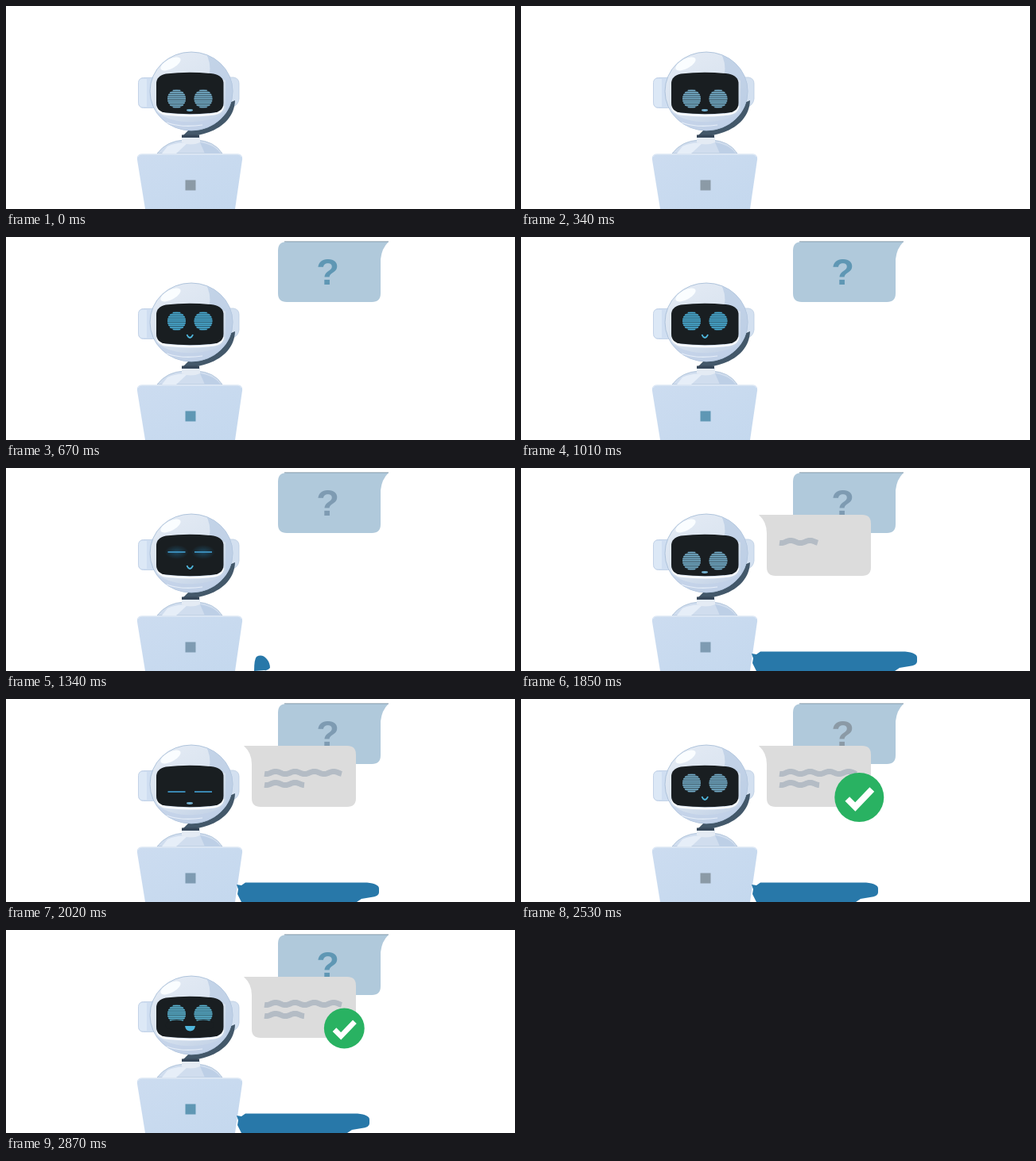
Animation, 640 px wide and 256 px high, one loop 3500 ms. Source, as an HTML page:

```html
<!DOCTYPE html>
<html lang="en">
<head>
<meta charset="utf-8">
<title>Robot assistant</title>
<style>
  html, body { margin: 0; width: 100%; height: 100%; overflow: hidden; background: #fff; }
  svg { display: block; width: 100vw; height: 100vh; }
  text { font: bold 47px "Liberation Sans", Arial, sans-serif; }
</style>
</head>
<body>
<svg viewBox="0 0 640 256">
  <defs>
    <linearGradient id="shell" x1=".2" y1="0" x2=".75" y2="1">
      <stop offset="0" stop-color="#e3eaf4"/>
      <stop offset=".5" stop-color="#dae4f0"/>
      <stop offset="1" stop-color="#c0d0e5"/>
    </linearGradient>
    <linearGradient id="lid" x1="0" y1="0" x2="1" y2="1">
      <stop offset="0" stop-color="#ccdcf0"/>
      <stop offset="1" stop-color="#c4d8ee"/>
    </linearGradient>
    <radialGradient id="glow">
      <stop offset="0" stop-color="#1f6d96" stop-opacity=".5"/>
      <stop offset="1" stop-color="#1f6d96" stop-opacity="0"/>
    </radialGradient>
    <clipPath id="headClip"><ellipse cx="233" cy="107.500" rx="52" ry="49.500"/></clipPath>
  </defs>

  <g id="robot">
    <rect x="166.500" y="90.500" width="24" height="38" rx="6" fill="#cfdef1" stroke="#c3d3e8"/>
    <path d="M170 92h7v35h-7q-3-2-3-6V97q0-4 3-5Z" fill="#dce8f6"/>
    <path d="M279 90h7q7 1 7 8v19q-1 8-8 10h-6Z" fill="#d3e0f0" stroke="#bccde2" stroke-width=".8"/>
    <path d="M288 119C287 146 262 164 221 165L230 156C256 155 276 140 281 122Z" fill="#43586a"/>
    <path d="M190 186Q202 170 224 169h15Q262 170 272 186Z" fill="#d0ddee" stroke="#a9bed6" stroke-width=".8"/>
    <path d="M244 172Q262 175 270 186H250Z" fill="#bdcfe6"/>
    <path d="M203 177Q216 171 228 173L214 186H196Z" fill="#e6eef8"/>
    <path d="M221 165h23v7q-12 5-23 0Z" fill="#e4ebf4"/>
    <path d="M221 162.500h22v3.500h-22Z" fill="#37485a"/>
    <ellipse cx="233" cy="107.500" rx="52" ry="49.500" fill="url(#shell)" stroke="#a9bfd8" stroke-width=".9"/>
    <g clip-path="url(#headClip)">
      <path d="M250 57Q258 70 256 84L276 94V140L300 130V70Z" fill="#bacde5" opacity=".75"/>
      <path d="M184 128Q202 148 237 146T284 122V160H190Z" fill="#c0d1e8" opacity=".7"/>
      <path d="M202 147Q222 154 247 150" fill="none" stroke="#e6eef8" stroke-width="1.200"/>
    </g>
    <ellipse cx="207" cy="73" rx="14" ry="6" transform="rotate(-29 207 73)" fill="#fafdff"/>
    <path d="M190 126Q191 135 202 136.500Q231 140 260 136.500Q272 135 273 126" fill="none" stroke="#f8fbff" stroke-width="2.500"/>
    <path d="M201 85.500Q231 82 261 85.500Q273.500 88 273.500 98V122Q273.500 133 261 134.500Q231 138 201 134.500Q189 133 189 122V98Q189 88 201 85.500Z" fill="#191e21"/>
    <g id="face"></g>
    <path d="M171 187H291Q298 187 297 194L288 256H175L165 194Q164 187 171 187Z" fill="url(#lid)"/>
    <path d="M166 190Q167 187 171 187H291Q295 187 296 190" fill="none" stroke="#dde8f5" stroke-width="1.500"/>
    <rect id="badge" x="225.500" y="219.500" width="13" height="13"/>
  </g>

  <g id="question">
    <path d="M353 6H481Q472.500 14 471 28V71Q471 82 460 82H353Q342 82 342 71V17Q342 6 353 6Z" fill="#b0c9db"/>
    <path d="M350 5.800H481" stroke="#627c8e" stroke-width=".7"/>
    <text id="mark" x="404.500" y="60" text-anchor="middle">?</text>
  </g>

  <path id="answer" fill="#dcdcdc"/>
  <g id="lines" fill="none" stroke="#b4bcc5" stroke-width="7"></g>
  <g id="check">
    <circle r="31" fill="#29b262"/>
    <path d="M-15 2L-5 12L16-10" fill="none" stroke="#fff" stroke-width="8"/>
  </g>
  <path id="blob" fill="#2878a9"/>
</svg>

<script>
const LOOP = 3500;
const GREY = '#8b9aa6', SLATE = '#7e9bb2', BLUE = '#5f97b4';
const VISOR = '#191e21';
const $ = id => document.getElementById(id);

// Each step holds until the next; omitted properties keep their value.
const steps = [
  { at: 0, eyes: 'open', eyeY: 117, mouth: 'dash', tint: GREY, glowing: '#74adc9',
    question: false, answer: 0, lines: 0, check: 0, blob: 0 },
  { at: 670, eyeY: 106, mouth: 'smile', tint: BLUE, glowing: '#4aaed6', question: true },
  { at: 1340, eyes: 'shut', tint: SLATE, blob: 332 },
  { at: 1510, eyes: 'open', eyeY: 117, mouth: 'dash', glowing: '#74adc9', answer: .25, blob: 337 },
  { at: 1680, answer: .6, blob: 343 },
  { at: 1850, answer: 1, lines: .5, blob: 498 },
  { at: 2020, eyes: 'shut', lines: 1, blob: 469 },
  { at: 2190, eyes: 'open', eyeY: 106, mouth: 'smile', blob: 476 },
  { at: 2360, check: .5, blob: 474 },
  { at: 2530, tint: GREY, check: 1, blob: 449 },
  { at: 2700, check: .87, blob: 472 },
  { at: 2870, eyes: 'happy', mouth: 'grin', tint: BLUE, glowing: '#5ab4d2', check: .82, blob: 457 }
];

const mouths = {
  dash: c => `<ellipse cx="231" cy="131.500" rx="4" ry="1.400" fill="${c}"/>`,
  smile: c => `<path d="M227.500 123Q229 127 231.200 127Q233.500 127 235 123" fill="none" stroke="${c}" stroke-width="1.800"/>`,
  grin: c => `<path d="M225 121H238Q237 127.500 231.500 127.500T225 121Z" fill="${c}"/>`
};

function eye(x, { eyes, eyeY: y, glowing }) {
  if (eyes === 'shut') {
    const glow = y < 110 ? `<ellipse cx="${x}" cy="${y}" rx="15" ry="9" fill="url(#glow)"/>` : '';
    return `${glow}<path d="M${x - 11} ${y}h22" stroke="#3e93c2" stroke-width="1.800"/>`;
  }
  const radius = 11.5;
  let rows = '';
  for (let dy = -10.5; dy <= 11; dy += 2.625) {
    const half = Math.sqrt(radius ** 2 - dy ** 2);
    rows += `M${x - half} ${y + dy}h${2 * half}`;
  }
  const cheek = eyes === 'happy'
    ? `<ellipse cx="${x}" cy="${y + 14}" rx="14" ry="6.500" fill="${VISOR}"/>` : '';
  return `<circle cx="${x}" cy="${y}" r="${radius}" fill="${glowing}" opacity=".42"/>
    <path d="${rows}" stroke="${glowing}" stroke-width="1.500"/>${cheek}`;
}

function answerPath(scale) {
  if (!scale) return '';
  const left = 299 + 10 * scale, right = 299 + 141 * scale;
  const bottom = 59 + 77 * scale, tail = 59 + 23 * scale;
  const r = Math.min(11, 18 * scale);
  return `M299 59H${right - r}Q${right} 59 ${right} ${59 + r}V${bottom - r}
    Q${right} ${bottom} ${right - r} ${bottom}H${left + r}
    Q${left} ${bottom} ${left} ${bottom - r}V${tail}Q${left} ${59 + 9 * scale} 299 59Z`;
}

function wave(y, width) {
  const points = [];
  for (let x = 0; x <= width; x += 1)
    points.push(`${325 + x} ${(y + 1.6 * Math.cos(x * Math.PI * 2 / 24.3 - .5)).toFixed(2)}`);
  return `<path d="M${points.join('L')}"/>`;
}

function blobPath(right) {
  if (!right) return '';
  if (right < 335) return 'M312 256Q312 241 315 238Q322 234 328 241Q332 246 332 252Q329 256 325 255Z';
  if (right < 345) return `M307 256Q308 236 317 233H${right - 13}Q${right} 235 ${right} 242
    Q${right} 250 ${right - 10} 252Q324 252 322 256Z`;
  return `M290 234L296 235L301 231.500H${right - 15}Q${right} 233 ${right} 239V244
    Q${right} 249 ${right - 10} 250L${right - 22} 252L${right - 28} 256H296L291 246L292 240Z`;
}

function stateAt(time) {
  return Object.assign({}, ...steps.filter(step => step.at <= time));
}

function draw(time) {
  const s = stateAt(time);
  $('face').innerHTML = eye(214.5, s) + eye(248, s) + mouths[s.mouth](s.mouth === 'dash' ? '#74b1d0' : '#4fb6dc');
  $('badge').setAttribute('fill', s.tint);
  $('mark').setAttribute('fill', s.tint);
  $('question').setAttribute('visibility', s.question ? 'visible' : 'hidden');
  $('answer').setAttribute('d', answerPath(s.answer));
  $('lines').innerHTML = s.lines ? wave(93, 97 * s.lines) + (s.lines === 1 ? wave(107, 50) : '') : '';
  $('check').setAttribute('transform', `translate(425.3 124) scale(${s.check})`);
  $('blob').setAttribute('d', blobPath(s.blob));
}

const start = performance.now();
function tick() {
  draw((performance.now() - start) % LOOP);
  requestAnimationFrame(tick);
}
tick();
</script>
</body>
</html>
```
